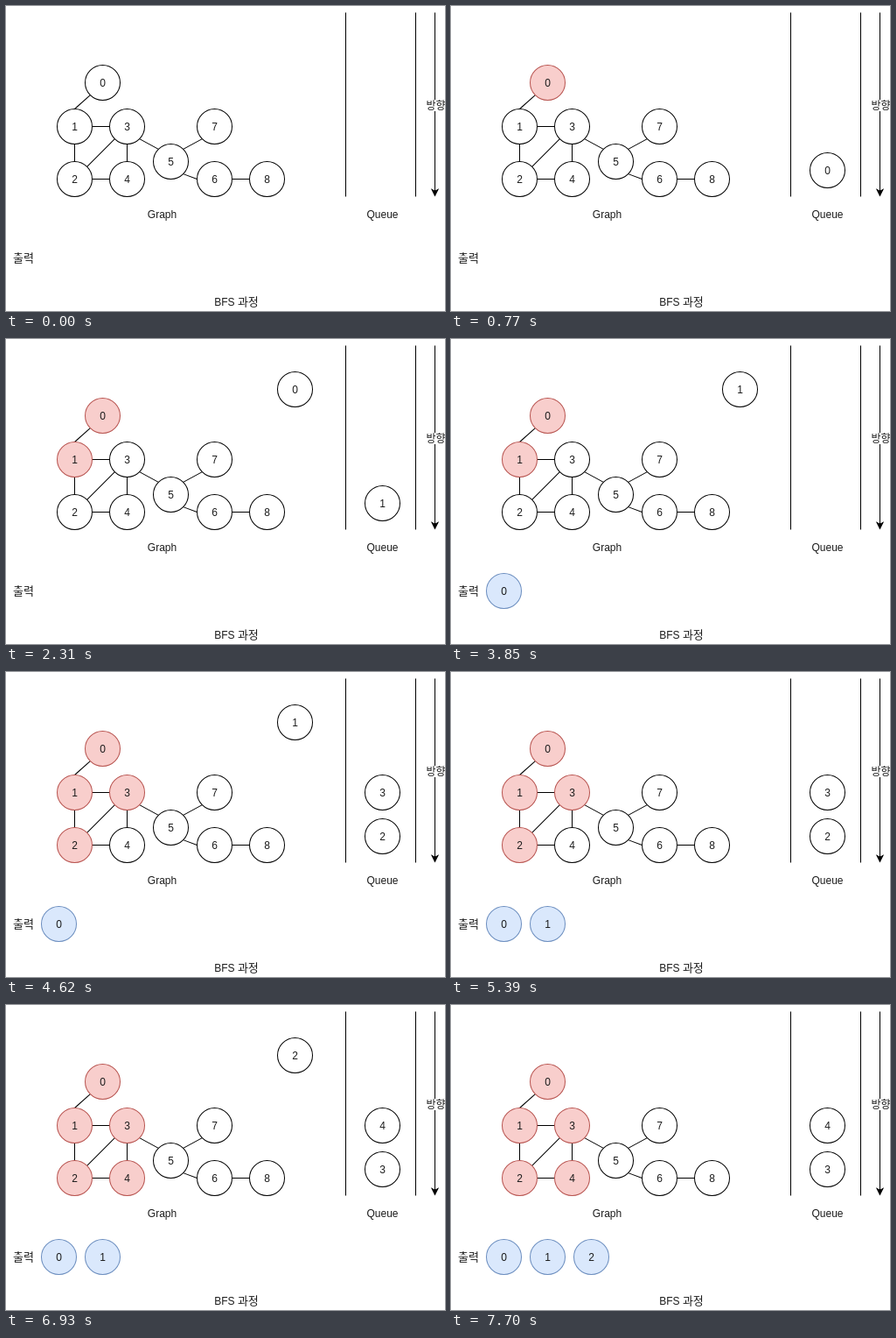
Write an HTML page that moves like this. It is 502x348 px and loops after 8 s.

```html
<!DOCTYPE html>
<html lang="ko">
<head>
<meta charset="utf-8">
<title>BFS</title>
<style>
  html, body { margin: 0; width: 100%; height: 100%; overflow: hidden; background: #fff; }
  svg { display: block; }
  text { font: 12px "Liberation Sans", "Noto Sans CJK KR", "Noto Sans CJK", sans-serif; text-anchor: middle; fill: #1c1c1c; }
  .ko { font-size: 13px; font-weight: 300; }
  .small { font-size: 12px; }
  /* Just over 1px, so slanted strokes are antialiased at full width */
  circle, path { fill: #fff; stroke: #000; stroke-width: 1.01; }
  .visited circle { fill: #f8cecc; stroke: #b85450; }
  .output circle { fill: #dae8fc; stroke: #6c8ebf; }
</style>
</head>
<body>
<svg width="502" height="348" viewBox="0 0 502 348">
  <path id="edges"/>
  <path d="M388.5 7.5v210M468.5 7.5v210M490.5 7.5v204"/>
  <path d="M490.5 216.4l-3.5-7 3.5 1.75 3.5-1.75z" style="fill:#000"/>
  <rect x="481" y="107" width="21" height="13" fill="#fff"/>
  <text x="491.5" y="118" class="ko small">방향</text>
  <text x="178.5" y="242">Graph</text>
  <text x="430.5" y="242">Queue</text>
  <text x="20" y="292" class="ko">출력</text>
  <text x="263.5" y="342">BFS <tspan class="ko">과정</tspan></text>
  <g id="nodes"></g>
</svg>
<script>
const STEP = 770, LOOP = 8000, RADIUS = 20;
const points = [[110, 87], [78, 137], [78, 197], [138, 137], [138, 197], [188, 177], [238, 197], [238, 137], [298, 197]]
  .map(([x, y]) => ({ x: x + .5, y: y + .5 }));

// Each end is a node and the compass side where the line meets it
const compass = ["e", "se", "s", "sw", "w", "nw", "n", "ne"];
const edges = "0sw-1n 1s-2n 1e-3w 2ne-3sw 2e-4w 3s-4n 3se-5nw 5se-6w 5ne-7sw 6e-8w"
  .split(" ").map(edge => edge.split("-").map(end => ({ id: +end[0], side: end.slice(1) })));

function anchor({ id, side }) {
  const angle = compass.indexOf(side) * Math.PI / 4;
  return `${points[id].x + RADIUS * Math.cos(angle)} ${points[id].y + RADIUS * Math.sin(angle)}`;
}

const neighbours = id => edges
  .filter(ends => ends.some(end => end.id === id))
  .map(([a, b]) => a.id === id ? b.id : a.id);

// Breadth-first search, with a snapshot after every action
function search(start) {
  const states = [], visited = [], queue = [], output = [];
  let current = null;
  const save = () => states.push({ visited: [...visited], queue: [...queue], output: [...output], current });
  const enqueue = id => { visited.push(id); queue.push(id); };

  save();
  enqueue(start);
  save();
  while (queue.length) {
    current = queue.shift();
    save();
    const found = neighbours(current).filter(id => !visited.includes(id));
    found.forEach(enqueue);
    if (found.length) save();
    output.push(current);
    current = null;
    save();
  }
  return states;
}

const node = (id, x, y, kind = "") =>
  `<g class="${kind}"><circle cx="${x}" cy="${y}" r="${RADIUS}"/><text x="${x}" y="${y + 4.5}">${id}</text></g>`;

function draw({ visited, queue, output, current }) {
  const parts = [
    ...points.map(({ x, y }, id) => node(id, x, y, visited.includes(id) ? "visited" : "")),
    ...queue.map((id, i) => node(id, 430.5, 187.5 - 50 * i)),
    ...output.map((id, i) => node(id, 60.5 + 50 * i, 287.5, "output"))
  ];
  if (current !== null) parts.push(node(current, 330.5, 57.5));
  document.getElementById("nodes").innerHTML = parts.join("");
}

document.getElementById("edges").setAttribute("d", edges.map(([a, b]) => `M${anchor(a)}L${anchor(b)}`).join(""));

const states = search(0);
let shown = -1;

function tick() {
  const index = Math.floor(performance.now() % LOOP / STEP);
  if (index !== shown) draw(states[shown = index]);
  requestAnimationFrame(tick);
}
tick();
</script>
</body>
</html>
```
